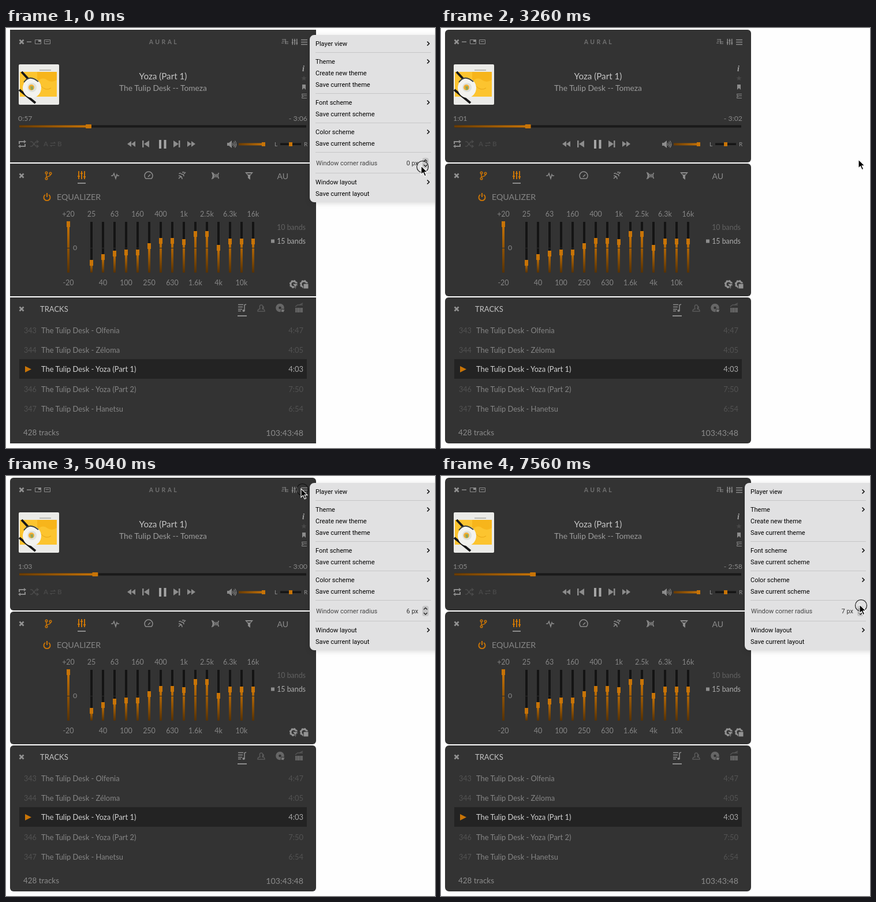
An HTML page for the animation above (8000 ms loop, 743 px wide and 728 px high).

```html
<!DOCTYPE html>
<html lang="en">
<head>
<meta charset="utf-8">
<title>Player</title>
<style>
  html, body { margin: 0; width: 100%; height: 100%; overflow: hidden; background: #fefefe; }
  svg { display: block; }
  text { font-family: Lato, sans-serif; white-space: pre; }
  #menu text { font-family: Roboto, sans-serif; }
  #menu { filter: drop-shadow(0 2px 4px rgba(0, 0, 0, .14)); }
  .line { fill: none; stroke: #8c8c8c; stroke-width: 1.5; }
  .solid { fill: #8c8c8c; }
  .dim { fill: none; stroke: #4b4b4b; stroke-width: 1.5; }
</style>
</head>
<body>
<svg id="stage" width="743" height="728" viewBox="0 0 743 728">
  <defs>
    <linearGradient id="across"><stop stop-color="#6a3c03"/><stop offset="1" stop-color="#c87407"/></linearGradient>
    <linearGradient id="down" x2="0" y2="1"><stop stop-color="#c87407"/><stop offset="1" stop-color="#553104"/></linearGradient>
    <path id="close" d="M-3.5-3.5l7 7m0-7l-7 7" fill="none" stroke="#929292" stroke-width="2.6"/>
    <path id="sliders" d="M-5-7V7M0-7V7M5-7V7M-7 2h4M-2-3h4M3 3h4" fill="none" stroke="currentColor" stroke-width="2"/>
    <g id="gear">
      <circle r="5" fill="none" stroke="#929292" stroke-width="3"/>
      <circle r="6.2" fill="none" stroke="#929292" stroke-width="2" stroke-dasharray="2.4 2.47"/>
    </g>
  </defs>

  <g id="panels" fill="#333">
    <rect x="7" y="3" width="530" height="230"/>
    <rect x="7" y="235" width="530" height="230"/>
    <rect x="7" y="467" width="530" height="253"/>
  </g>

  <g id="player">
    <use href="#close" x="27" y="24"/>
    <path class="line" d="M36 24h8" stroke-width="3"/>
    <path class="line" d="M50.5 20.5h10v7h-10zM66.5 20.5h10v7h-10zM68.5 23.5h6" style="stroke-width:1"/>
    <path class="solid" d="M56 20h5v4h-5z"/>
    <path class="line" d="M478 20h5M478 23h4M477 26h4M484 27v-8M483 24h6M483 27h6" style="stroke-width:1.2"/>
    <use href="#sliders" transform="translate(500 24) scale(.75)" color="#8c8c8c"/>
    <path class="line" d="M511 20.5h11M511 24.5h11M511 28.5h11"/>

    <rect x="22" y="63" width="70" height="70" rx="2" fill="#ebebe8"/>
    <path d="M24 76h64v43H24z" fill="#fcc42f"/>
    <path d="M54 76h34v14q-9 6-17 0t-17 3z" fill="#f7b51b"/>
    <path d="M58 73h20" stroke="#8a8a80"/>
    <path d="M60 100q9 10 18 4" fill="none" stroke="#e8a514"/>
    <path d="M27 76l30 32M23 107l28 23" stroke="#171717" stroke-width="4"/>
    <ellipse cx="45" cy="104" rx="16" ry="17" fill="#f3f3ef"/>
    <path d="M31 94q10-14 25-1" fill="none" stroke="#3b4140" stroke-width="2"/>
    <circle cx="45" cy="103" r="8" fill="#dfe2dc"/>
    <circle cx="44" cy="103" r="5" fill="#f2ae32"/>
    <path d="M42 101h5v6h-4z" fill="#8fa65a"/>

    <path d="M516 82.5l1.3 3 3.2.3-2.4 2 .8 3.2-2.9-1.7-2.9 1.7.8-3.2-2.4-2 3.2-.3z" fill="#484848"/>
    <path class="solid" d="M513 98h6v9l-3-3-3 3z"/>
    <path class="line" d="M512 114.5h9M516 117.5h5M512 121.5h9M512 116l3 2-3 2" style="stroke-width:1.2"/>

    <rect x="23" y="168.5" width="497" height="4" fill="#191919"/>
    <rect id="played" x="23" y="168.5" height="4" fill="url(#across)"/>
    <rect id="knob" y="167" width="10" height="7" rx="1" fill="#c87407"/>

    <path class="line" d="M23 201v-4h9M33 201v4h-9" style="stroke-width:2"/>
    <path class="solid" d="M31 194l4 3-4 3zM25 202l-4 3 4 3z"/>
    <path class="dim" d="M42 197h3l7 8h4M42 205h3l7-8h4M53 194.500l3 2.500-3 2.500M53 202.500l3 2.500-3 2.500"/>
    <path class="dim" d="M77 199.500h8l-2-2M85 203.500h-8l2 2" style="stroke-width:1.2"/>
    <path class="solid" d="M217 196v10l-7-5zM224 196v10l-7-5zM236 195h2.500v12H236zM248 195v12l-9-6z
      M290 195v12l9-6zM299 195h2.500v12H299zM314 196v10l7-5zM321 196v10l7-5z"/>
    <path fill="#a5a5a5" d="M265 194h4v15h-4zM273.500 194h4v15h-4z"/>
    <path class="solid" d="M383 199h3l5-4v13l-5-4h-3z"/>
    <path class="line" d="M392.500 199q2 2.500 0 5M394.500 197q3.500 4.500 0 9M396.500 195.500q4.500 6 0 12" style="stroke-width:1.1"/>
    <rect x="403" y="199.500" width="45" height="4" fill="url(#across)"/>
    <rect x="443" y="198" width="6" height="7" fill="#c87407"/>
    <rect x="475" y="199.500" width="36" height="3.500" fill="#151515"/>
    <rect x="490" y="198" width="6" height="7" fill="#c87407"/>
  </g>

  <g id="effects">
    <use href="#close" x="27" y="256"/>
    <g fill="none" stroke="#c87407" stroke-width="1.5">
      <circle cx="70" cy="251" r="1.800"/><circle cx="70" cy="261" r="1.800"/><circle cx="77" cy="252" r="1.800"/>
      <path d="M70 253v6M77 254q0 3-7 4"/>
      <path d="M68 289a5.500 5.500 0 1 0 6 0M71 286v7" stroke-width="2"/>
    </g>
    <use href="#sliders" x="131" y="255" color="#c87407"/>
    <path class="line" d="M124 269h14" style="stroke-width:2"/>
    <path class="line" d="M182 256h3l2-4 3 9 2-7 1 2h3"/>
    <path class="line" d="M242 261a7 7 0 1 1 10 0zM246 258l4-4"/>
    <path class="line" d="M299 261l4-4M299 256q6 0 6 6M300 253q0-2 3-1M303 253q5 0 5 4M305 250h4M308 253l3-3"/>
    <path class="line" d="M358 251q3 5 0 10M361 253q2 3 0 6M365 253q-2 3 0 6M368 251q-3 5 0 10M356 250q4 6 0 12" transform="translate(.5 0)"/>
    <path class="solid" d="M414 250h14l-5 6v7l-4-3v-4z"/>
    <path d="M417 252h8l-2 2h-4z" fill="#333"/>
    <rect x="459" y="366.500" width="6" height="6" fill="#8c8c8c"/>
    <use href="#gear" x="498" y="444"/>
    <path d="M496 443h10l-4 5v5l-2-2v-3z" fill="#929292" stroke="#333"/>
    <use href="#gear" x="516" y="444"/>
    <path d="M515 443h9v9h-9z" fill="#929292" stroke="#333"/>
  </g>

  <g id="tracks">
    <use href="#close" x="27" y="487"/>
    <path class="line" d="M402 479.500h9M402 483.500h8M402 487.500h7M402 490.500h5M413 491v-11l3-1"/>
    <circle class="solid" cx="411.500" cy="490" r="2"/>
    <path class="line" d="M401 499h16" style="stroke-width:2"/>
    <path class="dim" d="M436 491q0-4 4-4-2-7 2-7t2 7q4 0 4 4zM444 482q4 1 1 5" style="stroke:#5a5a5a"/>
    <circle cx="474.500" cy="485" r="4.800" fill="none" stroke="#666" stroke-width="5"/>
    <path d="M477 487l6 1-2 5-5-1z" fill="#777" stroke="#333"/>
    <path d="M501 485h13v8h-13z" fill="#626262"/>
    <path class="dim" d="M501 483l4-3h9M508 480l6-3M504 485v8M509 485v8" style="stroke:#555"/>
    <rect x="23" y="574" width="498" height="34" fill="#232323"/>
    <path d="M33 586v11l11-5.500z" fill="#c87407"/>
  </g>

  <g id="menu">
    <rect x="526" y="12" width="232" height="290" rx="8" fill="#e1e1e2"/>
    <path d="M536 42.500h200M536 113.500h200M536 164.500h200M536 215.500h200M536 251.500h200" stroke="#c6c6c7"/>
    <rect x="721" y="225" width="11" height="18" rx="3.500" fill="#c5c5c6"/>
    <path d="M723.500 231.500l3-3 3 3M723.500 237l3 3 3-3" fill="none" stroke="#222" stroke-width="1.300"/>
  </g>

  <circle id="ring" r="10" fill="none" stroke="#111" stroke-width="1.100"/>
  <path id="pointer" d="M0 0v15l3.500-3.300 2.600 6 2.600-1.100-2.600-5.700h4.900z" fill="#000" stroke="#fff" stroke-width="1.100"/>
</svg>

<script>
const $ = id => document.getElementById(id);
const NS = "http://www.w3.org/2000/svg";

function add(parent, tag, attrs, content = "") {
  const el = document.createElementNS(NS, tag);
  for (const name in attrs) el.setAttribute(name, attrs[name]);
  el.textContent = content;
  $(parent).append(el);
  return el;
}

// Text placed by its vertical centre
function label(parent, x, y, content, size, fill, anchor = "start", extra = {}) {
  return add(parent, "text",
    { x, y: y + size * .36, fill, "font-size": size, "text-anchor": anchor, ...extra }, content);
}

const band = "The Tulip Desk";

// Player
label("player", 273.5, 24, "AURAL", 10.5, "#707070", "middle", { "letter-spacing": 3.4, "font-weight": 700 });
label("player", 272, 83.500, "Yoza (Part 1)", 15.2, "#c6c6c6", "middle");
label("player", 272, 104, band + " -- Tomeza", 13.8, "#9c9c9c", "middle");
label("player", 513, 70, "i", 14, "#a0a0a0", "start",
  { style: "font-family:'Liberation Serif',serif", "font-weight": 700, "font-style": "italic" });
label("player", 65, 201, "A", 11.5, "#484848", "start", { "font-weight": 700 });
label("player", 89, 201, "B", 11.5, "#484848", "start", { "font-weight": 700 });
label("player", 465, 201, "L", 10, "#929292");
label("player", 516, 201, "R", 10, "#929292");
const elapsed = label("player", 21, 157, "", 12.3, "#8a8a8a");
const left = label("player", 522, 157, "", 12.3, "#8a8a8a", "end");

// Equalizer
label("effects", 469.500, 257, "AU", 14, "#8c8c8c");
label("effects", 88, 293, "EQUALIZER", 14.2, "#868686");
label("effects", 116, 381, "0", 12.3, "#8a8a8a");
label("effects", 519, 345.500, "10 bands", 12.4, "#626262", "end");
label("effects", 519, 369.500, "15 bands", 12.4, "#adadad", "end");

function slider(x, y) {
  add("effects", "rect", { x: x - 2, y: 336, width: 4, height: 88, fill: "#141414" });
  add("effects", "rect", { x: x - 2, y, width: 4, height: 424 - y, fill: "url(#down)" });
  add("effects", "rect", { x: x - 3, y: 381, width: 6, height: 1, fill: "#2b2b2b" });
  add("effects", "rect", { x: x - 3, y: y - 5, width: 6, height: 10, fill: "#c87407" });
}
slider(108, 340);
[407, 397, 391, 389, 389, 378, 369, 369, 371, 357, 357, 381, 370, 370, 370]
  .forEach((y, i) => slider(148 + i * 20, y));
"+20 25 63 160 400 1k 2.5k 6.3k 16k".split(" ")
  .forEach((s, i) => label("effects", 108 + i * 40, 322, s, 12.5, "#858585", "middle"));
label("effects", 108, 441, "-20", 12.5, "#858585", "middle");
"40 100 250 630 1.6k 4k 10k".split(" ")
  .forEach((s, i) => label("effects", 168 + i * 40, 441, s, 12.5, "#858585", "middle"));

// Track list
label("tracks", 59, 487, "TRACKS", 13, "#c2c2c2");
[["Olfenia", "4:47"], ["Zéloma", "4:05"], ["Yoza (Part 1)", "4:03"], ["Yoza (Part 2)", "7:50"], ["Hanetsu", "6:54"]]
  .forEach(([name, time], i) => {
    const y = 524 + i * 34 - (i == 2), on = i == 2;
    if (!on) label("tracks", 31, y, 343 + i, 12.6, "#525252");
    label("tracks", 61, y, `${band} - ${name}`, 12.9, on ? "#d2d2d2" : "#858585");
    label("tracks", 515, y, time, 13, on ? "#a8a8a8" : "#525252", "end");
  });
label("tracks", 30, 701.500, "428 tracks", 13.4, "#8c8c8c");
label("tracks", 515, 701.500, "103:43:48", 14.2, "#8c8c8c", "end");

// Menu: a leading ">" marks a submenu
[[27, ">Player view"], [58, ">Theme"], [78, "Create new theme"], [98, "Save current theme"],
 [129, ">Font scheme"], [149, "Save current scheme"], [180, ">Color scheme"], [200, "Save current scheme"],
 [267, ">Window layout"], [287, "Save current layout"]].forEach(([y, s]) => {
  label("menu", 536, y, s.replace(">", ""), 11, "#000");
  if (s[0] == ">") add("menu", "path",
    { d: `M729.500 ${y - 3.500}l3.500 3.500-3.500 3.500`, fill: "none", stroke: "#111", "stroke-width": 1.6 });
});
label("menu", 537, 234.500, "Window corner radius", 11, "#444");
const radiusText = label("menu", 714, 234.500, "", 11, "#333", "end");

// Motion, counted in ticks of 1/54 loop
const LOOP = 8000, TICK = LOOP / 54;
const clicks = [10, 11, 13, 15, 17, 19, 51];
const rings = [0, 10, 13, 15, 17, 18, 19, 34, 51, 52, 53];
const path = [[0, 719, 239], [3, 719, 239], [7, 723, 228], [26, 723, 228], [32, 511, 22],
  [36, 511, 22], [41, 576, 219], [44, 605, 229], [49, 725, 223], [54, 725, 223]];

function pointerAt(k) {
  const i = path.findIndex(p => p[0] > k);
  const [k0, x0, y0] = path[i - 1], [k1, x1, y1] = path[i];
  const u = (k - k0) / (k1 - k0), e = u * u * (3 - 2 * u);
  return [x0 + (x1 - x0) * e, y0 + (y1 - y0) * e];
}

const clock = s => `${Math.floor(s / 60)}:${String(s % 60).padStart(2, "0")}`;

function draw(t) {
  const k = Math.min(53, Math.floor((t + 8) / TICK));

  const beat = Math.floor((k + 2) / 3);
  const sec = 57 + Math.floor((beat * TICK * 3 + 900) / 1000);
  const head = 143 + beat * .95;
  elapsed.textContent = clock(sec);
  left.textContent = "- " + clock(243 - sec);
  $("played").setAttribute("width", head - 23);
  $("knob").setAttribute("x", head - 5);

  const radius = clicks.filter(c => c <= k).length;
  radiusText.textContent = radius + " px";
  for (const panel of $("panels").children) panel.setAttribute("rx", radius);
  $("menu").style.display = k < 22 || k > 33 ? "" : "none";

  const [x, y] = pointerAt(k);
  $("pointer").setAttribute("transform", `translate(${x} ${y})`);
  $("ring").setAttribute("transform", `translate(${x + 2.500} ${y + 1.500})`);
  $("ring").style.display = rings.includes(k) ? "" : "none";
}

const start = performance.now();
function frame() {
  draw((performance.now() - start) % LOOP);
  requestAnimationFrame(frame);
}
frame();
</script>
</body>
</html>
```
